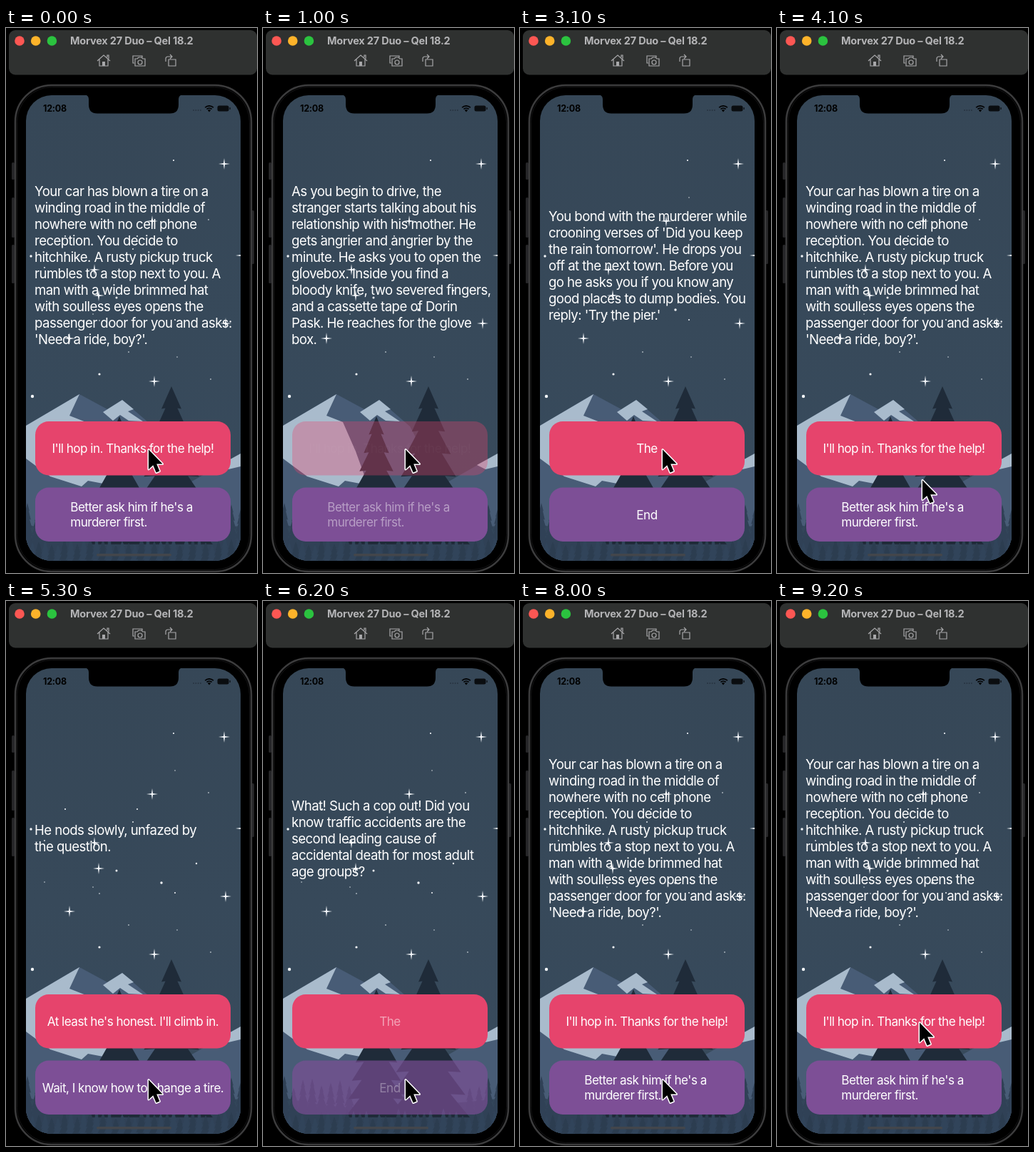
An HTML page with a canvas that plays this animation: 352x762 px, repeating every 9.8 s.

```html
<!DOCTYPE html>
<html lang="en">
<head>
<meta charset="utf-8">
<title>Story game</title>
<style>
html, body { margin: 0; width: 352px; height: 762px; overflow: hidden; background: #000; }
canvas { display: block; }
</style>
</head>
<body>
<canvas id="stage" width="352" height="762"></canvas>
<script>
const LOOP = 9800;
const FONT = 'Inter, Roboto, sans-serif';
const stage = document.getElementById('stage').getContext('2d');
const backdrop = document.createElement('canvas');
backdrop.width = 352;
backdrop.height = 762;

const scenes = [
  { story: "Your car has blown a tire on a|winding road in the middle of|nowhere with no cell phone|reception. You decide to|hitchhike. A rusty pickup truck|rumbles to a stop next to you. A|man with a wide brimmed hat|with soulless eyes opens the|passenger door for you and asks:|'Need a ride, boy?'.",
    choices: ["I'll hop in. Thanks for the help!", "Better ask him if he's a|murderer first."] },
  { story: "As you begin to drive, the|stranger starts talking about his|relationship with his mother. He|gets angrier and angrier by the|minute. He asks you to open the|glovebox. Inside you find a|bloody knife, two severed fingers,|and a cassette tape of Dorin|Pask. He reaches for the glove|box.",
    choices: ["I love Dorin Pask! Hand him the|cassette tape.", "It's him or me! You take the knife|and stab him."] },
  { story: "You bond with the murderer while|crooning verses of 'Did you keep|the rain tomorrow'. He drops you|off at the next town. Before you|go he asks you if you know any|good places to dump bodies. You|reply: 'Try the pier.'",
    choices: ["The", "End"] },
  { story: "He nods slowly, unfazed by|the question.",
    choices: ["At least he's honest. I'll climb in.", "Wait, I know how to change a tire."] },
  { story: "What! Such a cop out! Did you|know traffic accidents are the|second leading cause of|accidental death for most adult|age groups?",
    choices: ["The", "End"] }
];

// Each click: time, scene it opens, button pressed.
const clicks = [
  { at: -2000, scene: 0, button: 1 },
  { at: 1000, scene: 1, button: 0 },
  { at: 2200, scene: 2, button: 0 },
  { at: 3300, scene: 0, button: 0 },
  { at: 4600, scene: 3, button: 1 },
  { at: 6000, scene: 4, button: 1 },
  { at: 7400, scene: 0, button: 1 }
];
const buttons = [{ y: 550, fill: '#e6446c' }, { y: 642.5, fill: '#7d4f96' }];

const clamp = v => Math.max(0, Math.min(1, v));
const ease = p => (1 - Math.cos(Math.PI * clamp(p))) / 2;

function roundRect(c, x, y, w, h, r, fill, stroke) {
  c.beginPath();
  c.roundRect(x, y, w, h, r);
  if (fill) { c.fillStyle = fill; c.fill(); }
  if (stroke) { c.strokeStyle = stroke; c.stroke(); }
}

function shape(c, path, fill) {
  c.fillStyle = fill;
  c.fill(new Path2D(path));
}

function dot(c, x, y, r, fill) {
  c.fillStyle = fill;
  c.beginPath();
  c.arc(x, y, r, 0, 7);
  c.fill();
}

function tree(c, x, top, bottom, half, tiers, fill) {
  c.fillStyle = fill;
  c.beginPath();
  c.moveTo(x, top);
  const edge = k => [half * (k / tiers) ** .73, top + (bottom - top) * (k / tiers)];
  for (let k = 1; k <= tiers; k++) {
    const [w, y] = edge(k);
    c.lineTo(x + w, y);
    if (k < tiers) c.lineTo(x + w * .6, y - 1);
  }
  for (let k = tiers; k > 0; k--) {
    const [w, y] = edge(k);
    if (k < tiers) c.lineTo(x - w * .6, y - 1);
    c.lineTo(x - w, y);
  }
  c.fill();
}

function drawStars(c) {
  const dots = [[235, 185, 1.1], [237, 237, .7], [284, 268, .8], [83, 291, 1.1], [184, 291, 1],
    [178, 309, .9], [35, 319, 1.7], [54, 335, .9], [155, 377, 1.5], [267, 367, 1.2], [218, 394, 1.7],
    [237, 408, 1], [54, 393, .7], [122, 400, .7], [131, 409, .8], [172, 453, .8], [240, 460, .7],
    [131, 484, 1.6], [287, 491, .8], [37, 515, 2.2]];
  for (const [x, y, r] of dots) dot(c, x, y, r, '#f4f7fa');
  const sparkles = [[306, 190], [205, 270], [124, 338], [130, 374], [308, 413], [89, 434], [208, 494], [330, 318]];
  for (const [x, y] of sparkles)
    shape(c, `M${x} ${y - 8}l1 7 7 1-7 1-1 7-1-7-7-1 7-1Z`, '#f4f7fa');
}

function drawLandscape(c) {
  const sky = c.createLinearGradient(0, 94, 0, 745);
  sky.addColorStop(0, '#364757');
  sky.addColorStop(1, '#384b5d');
  c.fillStyle = sky;
  c.fillRect(28, 94, 302, 652);
  drawStars(c);

  const snow = '#a9bbcc', rock = '#485c76';
  shape(c, 'M28 556L103 512 142 533 163 520 206 557 250 640 329 595V746H28Z', rock);
  shape(c, 'M28 556L103 512 89 542 112 551 130 592 147 639 115 633 106 641 62 627 28 602Z', snow);
  shape(c, 'M136 537L163 520 179 533 171 536 192 550 172 549 160 541 150 549Z', snow);
  shape(c, 'M329 595V613L312 617 300 611Z', snow);
  shape(c, 'M28 694Q100 712 178 708T329 696V746H28Z', '#33465a');

  let seed = 7;
  const random = () => (seed = seed * 16807 % 2147483647) / 2147483647;
  for (let x = 30; x < 336; x += 13) {
    const middle = x > 125 && x < 285;
    tree(c, x, (middle ? 697 : 664) + random() * 18, 735, 11, 6, '#304156');
  }
  tree(c, 159, 543, 722, 44, 7, '#1f2b39');
  tree(c, 232, 501, 722, 58, 7, '#1f2b39');
  for (let x = 28; x < 336; x += 9)
    tree(c, x, 708 + random() * 16, 752, 9, 5, x % 2 ? '#31445a' : '#2c3d50');
}

function drawToolbar(c) {
  roundRect(c, 4, 3, 348, 62.5, 9, '#2f3130');
  ['#fc5753', '#fdb32a', '#2bc33f'].forEach((fill, i) => dot(c, 19 + i * 22.7, 18, 6.8, fill));
  c.fillStyle = '#b4b4b6';
  c.font = `700 14.5px ${FONT}`;
  c.letterSpacing = '-0.2px';
  c.fillText('Morvex 27 Duo – Qel 18.2', 90, 23);
  c.strokeStyle = '#a8a8aa';
  c.lineWidth = 1.2;
  c.stroke(new Path2D('M128 46L137 38 146 46M131 44V53H143V44M142 41V38H144V43'));
  shape(c, 'M135 53V47H139V53Z', '#a8a8aa');
  c.stroke(new Path2D('M180 49H178V39H191V41M181 43H184L186 41H190L192 43H195V53H181Z'));
  c.stroke(new Path2D('M191 48a3 3 0 1 1-6 0a3 3 0 1 1 6 0'));
  c.stroke(new Path2D('M228 44H238V53H228ZM224 47V43Q224 40 227 40H233M230 37L233 40 230 43'));
}

function drawStatusBar(c) {
  shape(c, 'M110 93Q116 94 116 100V107Q116 119.5 128 119.5H230Q242 119.5 242 107V100Q242 94 248 93Z', '#000');
  c.fillStyle = '#000';
  c.font = `700 12.5px ${FONT}`;
  c.letterSpacing = '-0.2px';
  c.fillText('12:08', 52, 117);
  for (let i = 0; i < 4; i++) dot(c, 263 + i * 3.3, 115, .9, '#26323f');
  c.strokeStyle = '#000';
  c.lineWidth = 1.7;
  for (const r of [8.2, 5]) {
    c.beginPath();
    c.arc(285, 117, r, -2.36, -.78);
    c.stroke();
  }
  shape(c, 'M285 117.5L282.8 114.8Q285 113 287.2 114.8Z', '#000');
  roundRect(c, 296.5, 108.5, 16, 8, 2.5, '#0a0d10');
  c.fillRect(313.5, 111, 1.2, 3);
}

function drawBackdrop(c) {
  c.fillRect(0, 0, 352, 762);
  drawToolbar(c);
  for (const [x, y, h] of [[8, 188, 24], [8, 237, 56], [8, 303, 54], [344, 255, 75]])
    roundRect(c, x, y, 4, h, 1.5, '#262628');
  c.lineWidth = 2.5;
  roundRect(c, 13, 80, 331, 680, 51, '#000', '#3c3c3d');
  c.lineWidth = 1;
  roundRect(c, 15.5, 82.5, 326, 675, 49, null, '#151516');
  c.save();
  c.beginPath();
  c.roundRect(28, 94, 301, 651, 36);
  c.clip();
  drawLandscape(c);
  drawStatusBar(c);
  roundRect(c, 127, 735, 105, 3.6, 1.8, '#43464b');
  c.restore();
}

function setFont(c, size) {
  c.font = `400 ${size}px ${FONT}`;
  c.letterSpacing = `${-.03 * size}px`;
  c.fillStyle = '#fff';
}

function drawLines(c, lines, x, middle, pitch) {
  lines.forEach((line, i) => c.fillText(line, x, middle + (i - (lines.length - 1) / 2) * pitch));
}

function drawLabel(c, text, y, alpha) {
  setFont(c, 17.1);
  c.globalAlpha = alpha;
  const lines = text.split('|');
  const width = Math.max(...lines.map(line => c.measureText(line).width));
  // A wrapped line keeps its trailing space, which shifts the block left.
  drawLines(c, lines, (lines.length > 1 ? 176 : 178) - width / 2, y + 44.3, 21.2);
  c.globalAlpha = 1;
}

function drawButton(c, i, click, previous, elapsed) {
  const { y, fill } = buttons[i];
  const pressed = i === click.button;
  const body = pressed ? .33 + .67 * clamp(elapsed / 400) : 1;
  c.globalAlpha = body;
  roundRect(c, 41, y, 274, 75.5, 19, fill);
  const leaving = elapsed < 100;
  const label = scenes[(leaving ? previous : click).scene].choices[i];
  const fade = leaving ? (pressed ? .1 : .45) * (1 - elapsed / 100) : clamp((elapsed - 100) / 200);
  drawLabel(c, label, y, fade * body);
}

function drawCursor(c, t) {
  const p = ease((t - 3840) / 500) - ease((t - 8200) / 500);
  c.save();
  c.translate(200 + 4 * Math.sin(Math.PI * p), 589.5 + 80 * p);
  const arrow = new Path2D('M0 0V27.5L6.3 21.8 10.6 32 15.4 30 11.2 20H19.5Z');
  c.lineWidth = 3;
  c.lineJoin = 'round';
  c.strokeStyle = '#fff';
  c.stroke(arrow);
  c.fillStyle = '#000';
  c.fill(arrow);
  c.restore();
}

function draw() {
  const t = performance.now() % LOOP;
  const current = clicks.findLastIndex(click => click.at <= t);
  const click = clicks[current];
  const previous = clicks[Math.max(0, current - 1)];

  stage.drawImage(backdrop, 0, 0);
  setFont(stage, 18.6);
  drawLines(stage, scenes[click.scene].story.split('|'), 40, 338.8, 23);
  buttons.forEach((_, i) => drawButton(stage, i, click, previous, t - click.at));
  drawCursor(stage, t);
  requestAnimationFrame(draw);
}

drawBackdrop(backdrop.getContext('2d'));
draw();
</script>
</body>
</html>
```
